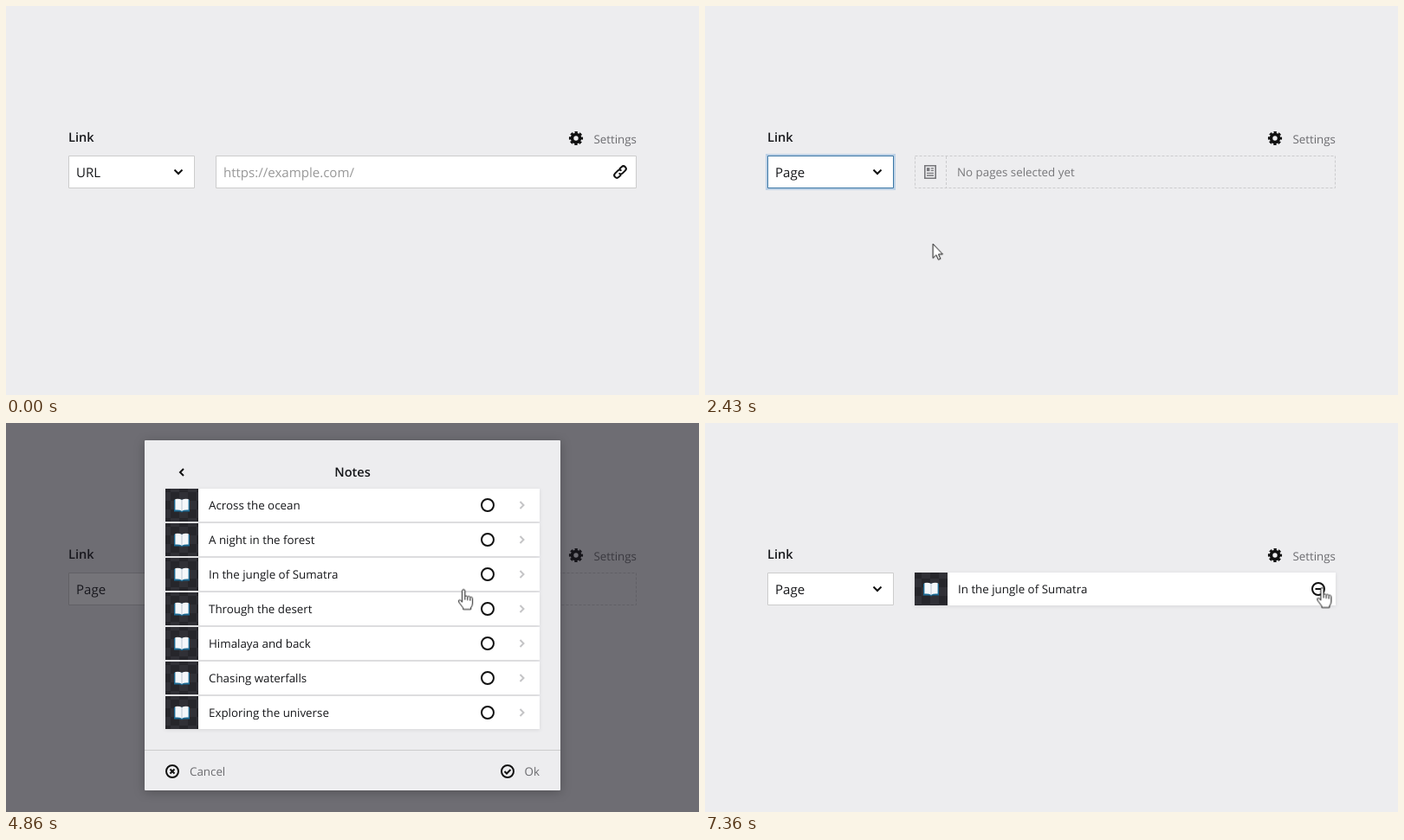
An HTML page that plays this animation: 800x450 px, repeating every 8 s.

```html
<!DOCTYPE html>
<html lang="en">
<head>
<meta charset="utf-8">
<title>Link field</title>
<style>
html, body { margin: 0; width: 100%; height: 100%; overflow: hidden; background: #ededef; }
#stage { position: absolute; left: 0; top: 0; width: 800px; height: 450px; overflow: hidden; }
svg { position: absolute; left: 0; top: 0; display: block; }
text { font: 13.35px "Open Sans", "Noto Sans", sans-serif; fill: #16171a; text-rendering: geometricPrecision; }
.big { font-size: 15.05px; }
.bold { font-size: 14.6px; font-weight: 600; }
.soft { fill: #6c6c70; }
.line { fill: none; stroke: #111; stroke-width: 2; }
.pale { stroke: #c4c4c6; }
.box { fill: #fff; stroke: #ccc; }
.dash { fill: none; stroke: #cbcbcd; stroke-dasharray: 3 2; }
.dialog { filter: drop-shadow(0 2px 6px rgba(0, 0, 0, .25)); }
.card { filter: drop-shadow(0 1px 2px rgba(22, 23, 26, .1)); }

.step { animation: 8s step-end infinite; }
.url { animation-name: url; }
.page { animation-name: page; }
.empty { animation-name: empty; }
.chosen { animation-name: chosen; }
.ring { animation-name: ring; }
.list { animation-name: list; }
.bar { animation-name: bar; }
.first { animation-name: first; }
.second { animation-name: second; }
.shade { animation-name: shade; }
.root { animation-name: root; }
.notes { animation-name: notes; }
.picked { animation-name: picked; }
.ok { animation-name: ok; }
.arrow { animation-name: arrow; }
.hand { animation-name: hand; }

@keyframes url { 0% { opacity: 1 } 27.1%, 100% { opacity: 0 } }
@keyframes page { 0% { opacity: 0 } 27.1%, 100% { opacity: 1 } }
@keyframes empty { 0% { opacity: 0 } 27.1% { opacity: 1 } 83.7%, 100% { opacity: 0 } }
@keyframes chosen { 0% { opacity: 0 } 83.7%, 100% { opacity: 1 } }
@keyframes ring { 0% { opacity: 0 } 17.8% { opacity: 1 } 37.45%, 100% { opacity: 0 } }
@keyframes list { 0% { opacity: 0 } 17.8% { opacity: 1 } 27.1%, 100% { opacity: 0 } }
@keyframes bar { 0% { transform: none } 21.6%, 100% { transform: translateY(22px) } }
@keyframes first { 0% { fill: #fff } 21.6%, 100% { fill: #111 } }
@keyframes second { 0% { fill: #111 } 21.6%, 100% { fill: #fff } }
@keyframes shade { 0% { opacity: 0 } 40.8% { opacity: 1 } 83.7%, 100% { opacity: 0 } }
@keyframes root { 0% { opacity: 0 } 40.8% { opacity: 1 } 56.9%, 100% { opacity: 0 } }
@keyframes notes { 0% { opacity: 0 } 56.9% { opacity: 1 } 83.7%, 100% { opacity: 0 } }
@keyframes picked { 0% { opacity: 0 } 67.4%, 100% { opacity: 1 } }
@keyframes ok { 0% { fill: #6c6c70 } 74.8%, 100% { fill: #2b2b2e } }
@keyframes arrow { 0% { opacity: 1 } 41.2%, 100% { opacity: 0 } }
@keyframes hand { 0% { opacity: 0 } 41.2%, 100% { opacity: 1 } }

#cursor {
  --enter: path("M528.5 452L187.5 193.5");
  --pick: path("M187.5 193.5Q188 225 183.5 250.5");
  --field: path("M183.5 250.5Q355 331 527.5 175.5");
  --row: path("M527.5 175.5Q566 192 594 156");
  --note: path("M594 156Q482 233 450 177");
  --done: path("M450 177Q430 275 569 401");
  --last: path("M569 401Q665 320 712.5 190.5");
  width: 1px; height: 1px; overflow: visible;
  offset-anchor: 0 0; offset-rotate: 0deg;
  animation: travel 8s cubic-bezier(.455, .03, .515, .955) infinite;
}
@keyframes travel {
  0%, 7.5% { offset-path: var(--enter); offset-distance: 0% }
  16.625% { offset-path: var(--enter); offset-distance: 100%; animation-timing-function: step-end }
  19.625% { offset-path: var(--pick); offset-distance: 0% }
  22.875% { offset-path: var(--pick); offset-distance: 100%; animation-timing-function: step-end }
  27.125% { offset-path: var(--field); offset-distance: 0% }
  37.125% { offset-path: var(--field); offset-distance: 100%; animation-timing-function: step-end }
  43.25% { offset-path: var(--row); offset-distance: 0% }
  53.25% { offset-path: var(--row); offset-distance: 100%; animation-timing-function: step-end }
  57% { offset-path: var(--note); offset-distance: 0% }
  65% { offset-path: var(--note); offset-distance: 100%; animation-timing-function: step-end }
  67.5% { offset-path: var(--done); offset-distance: 0% }
  77.5% { offset-path: var(--done); offset-distance: 100%; animation-timing-function: step-end }
  83.75% { offset-path: var(--last); offset-distance: 0% }
  92%, 100% { offset-path: var(--last); offset-distance: 100% }
}
</style>
</head>
<body>
<div id="stage">
<svg width="800" height="450" viewBox="0 0 800 450">
  <defs>
    <pattern id="check" width="20" height="20" patternUnits="userSpaceOnUse">
      <path fill="#26262b" d="M0 0h20v20H0z"/>
      <path fill="#303036" d="M0 0h10v10H0zM10 10h10v10H10z"/>
    </pattern>
    <g id="doc" fill="none" stroke="currentColor">
      <path stroke-width="1.6" d="M-6.2-7.2H6.2V7.2H-6.2z"/>
      <path stroke-width="1.3" d="M.8-4.2H4M.8-1.6H4M-4 1.3H4M-4 4H4"/>
      <path fill="currentColor" stroke="none" d="M-4-4.9H-.6v4H-4z"/>
    </g>
    <g id="book">
      <path fill="#1c6a94" d="M-9-6.2H9V7.6H1.5L0 8.4L-1.5 7.6H-9z"/>
      <path fill="#f4f7fa" d="M-7.6-7Q-3-8 0-6Q3-8 7.6-7V5.6Q3 5 0 6.8Q-3 5-7.6 5.6z"/>
      <path stroke="#b9c6d2" d="M0-6V6.6"/>
    </g>
    <g id="photo">
      <path fill="#c7955c" d="M-9-8H9V8H-9z"/>
      <path fill="#f3ead8" d="M-7-6H7V6H-7z"/>
      <path fill="#8cc8ea" d="M-6-5H6V2H-6z"/>
      <path fill="#4e9a4c" d="M-6 5V1L-2-2L1 2L4 0L6 2V5z"/>
      <circle cx="3" cy="-2.5" r="1.3" fill="#e8574a"/>
    </g>
    <g id="shirt">
      <path fill="#cf2a20" d="M-4-8Q0-5.500 4-8L9-4.500L7 0L5-1V8H-5V-1L-7 0L-9-4.500z"/>
      <circle cy="1" r="2" fill="#f0c9b8"/>
    </g>
    <g id="house">
      <path fill="#f5f3ee" d="M-6-1L0-7L6-1V8H-6z"/>
      <path fill="none" stroke="#d9503f" stroke-width="2" d="M-7.500 0L0-7.500L7.500 0"/>
      <path fill="#4aa3d8" d="M1 1H4.500V4.500H1z"/>
      <path fill="#a5613a" d="M-4 1.500H-1V8H-4z"/>
      <path fill="#d9503f" d="M3-8H5.500V-4H3z"/>
    </g>
  </defs>

  <text class="bold" x="72" y="157">Link</text>
  <g transform="translate(658 153)" fill="none" stroke="#111">
    <circle r="4.500" stroke-width="3.600"/>
    <circle r="6.800" stroke-width="2.600" stroke-dasharray="3.200 2.140" stroke-dashoffset="1.600"/>
  </g>
  <text class="soft" x="728" y="159" text-anchor="end">Settings</text>

  <g class="step ring"><path fill="#bfd2e6" d="M70 171H220V213H70z"/></g>
  <path class="box" d="M72.500 173.500H217.500V210.500H72.500z"/>
  <g class="step ring"><path fill="none" stroke="#3a76a5" d="M72.500 173.500H217.500V210.500H72.500z"/></g>
  <path class="line" d="M194.500 189.500l4.500 4.500 4.500-4.500"/>

  <g class="step url">
    <text class="big" x="81" y="198">URL</text>
    <path class="box" d="M242.500 173.500H727.500V210.500H242.500z"/>
    <text class="big" x="251" y="198" style="fill:#999">https://example.com/</text>
    <path class="line" transform="translate(709 192) rotate(-45)" d="M-1.500 3H-5.300a3 3 0 0 1 0-6H-1a3 3 0 0 1 3 3M1.500-3H5.300a3 3 0 0 1 0 6H1a3 3 0 0 1-3-3"/>
  </g>
  <text class="big step page" x="81" y="198">Page</text>

  <g class="step empty">
    <path class="dash" d="M242.500 173.500H727.500V210.500H242.500zM278.500 174V210"/>
    <use href="#doc" x="260" y="192" color="#77777b"/>
    <text x="291" y="197" style="fill:#77777a">No pages selected yet</text>
  </g>

  <g class="step chosen">
    <path class="card" fill="#fff" d="M242 173H728V211H242z"/>
    <path fill="url(#check)" d="M242 173h38v38h-38z"/>
    <use href="#book" x="261" y="192"/>
    <text x="292" y="197">In the jungle of Sumatra</text>
    <circle class="line" cx="708" cy="192" r="7"/>
    <path class="line" d="M704.500 192h7"/>
  </g>

  <g class="step list">
    <path fill="#fff" stroke="#64a6b8" d="M73.500 210.500H216.500V321.500H73.500z"/>
    <path class="step bar" fill="#1e90ff" d="M74 211H216V233H74z"/>
    <g id="options"></g>
  </g>

  <path class="step shade" fill="rgba(26,24,32,.6)" d="M0 0H800V450H0z"/>
  <g class="step root"><g class="dialog" id="root"></g></g>
  <g class="step notes"><g class="dialog" id="notes"></g></g>
</svg>

<svg id="cursor">
  <path class="step arrow" fill="#fff" stroke="#111" d="M0 0V16.500L3.800 12.900L6.300 18.300L8.800 17.200L6.400 12H11.300z"/>
  <g class="step hand" stroke="#111" stroke-linejoin="round">
    <path fill="#fff" d="M-1.700 1.700a1.700 1.700 0 0 1 3.400 0V8.300a1.600 1.600 0 0 1 3 .4a1.600 1.600 0 0 1 3 .8a1.500 1.500 0 0 1 2.700 1.200V16q0 3-2 5V23H-.500V21.300L-5.200 15q-1.500-3 .7-3q1.300 0 2.800 2.500z"/>
    <path fill="none" d="M1.700 8.300V12M4.700 9V12.500M7.700 10V13"/>
  </g>
</svg>
</div>

<script>
const fill = (id, html) => { document.getElementById(id).innerHTML = html; };

const row = ([label, icon, open], i, top) => {
  const y = top + i * 40, mid = y + 19;
  return `<path class="card" fill="#fff" d="M184 ${y}h432v38h-432z"/>
    <path fill="url(#check)" d="M184 ${y}h38v38h-38z"/>
    <use href="#${icon}" x="203" y="${mid}" color="#a3a3a8"/>
    <text x="234" y="${mid + 5}">${label}</text>
    <circle class="line" cx="556" cy="${mid}" r="7"/>
    <path class="line ${open ? '' : 'pale'}" d="M593.500 ${mid - 4}l4 4-4 4"/>`;
};

const dialog = (title, top, rows, okClass) => {
  const height = 125 + rows.length * 40, foot = top + height - 22;
  return `<rect x="160" y="${top}" width="480" height="${height}" rx="1" fill="#ededef"/>
    <text class="bold" x="400" y="${top + 42}" text-anchor="middle">${title}</text>
    ${rows.map((r, i) => row(r, i, top + 56)).join('')}
    <path stroke="#ccc" d="M160 ${foot - 24.5}h480"/>
    <circle class="line" cx="192" cy="${foot}" r="7"/>
    <path class="line" d="M189.500 ${foot - 2.5}l5 5m0-5l-5 5"/>
    <text class="soft" x="212" y="${foot + 5}">Cancel</text>
    <circle class="line" cx="579" cy="${foot}" r="7"/>
    <path class="line" d="M575.500 ${foot}l2.500 2.500 4.500-4.500"/>
    <text class="${okClass}" x="616" y="${foot + 5}" text-anchor="end">Ok</text>`;
};

const tints = ['step first', 'step second'];
fill('options', ['URL', 'Page', 'File', 'Email', 'Phone'].map((name, i) =>
  `<text class="big ${tints[i] || ''}" x="74.500" y="${228 + i * 22}">${name}</text>`).join(''));

fill('root', dialog('Wordlæne', 40, [
  ['Photography', 'photo', true], ['Notes', 'book', true], ['About us', 'shirt'],
  ['Page', 'doc'], ['Home', 'house'], ['Sandbox', 'doc']
], 'soft'));

fill('notes', dialog('Notes', 20, [
  'Across the ocean', 'A night in the forest', 'In the jungle of Sumatra', 'Through the desert',
  'Himalaya and back', 'Chasing waterfalls', 'Exploring the universe'
].map(name => [name, 'book']), 'step ok') +
  `<path class="line" d="M205 53l-4 4 4 4"/>
   <g class="step picked">
     <circle cx="556" cy="175" r="7" fill="#fff" stroke="#5d800d" stroke-width="2.200"/>
     <circle cx="556" cy="175" r="4.500" fill="#5d800d"/>
   </g>`);
</script>
</body>
</html>
```
